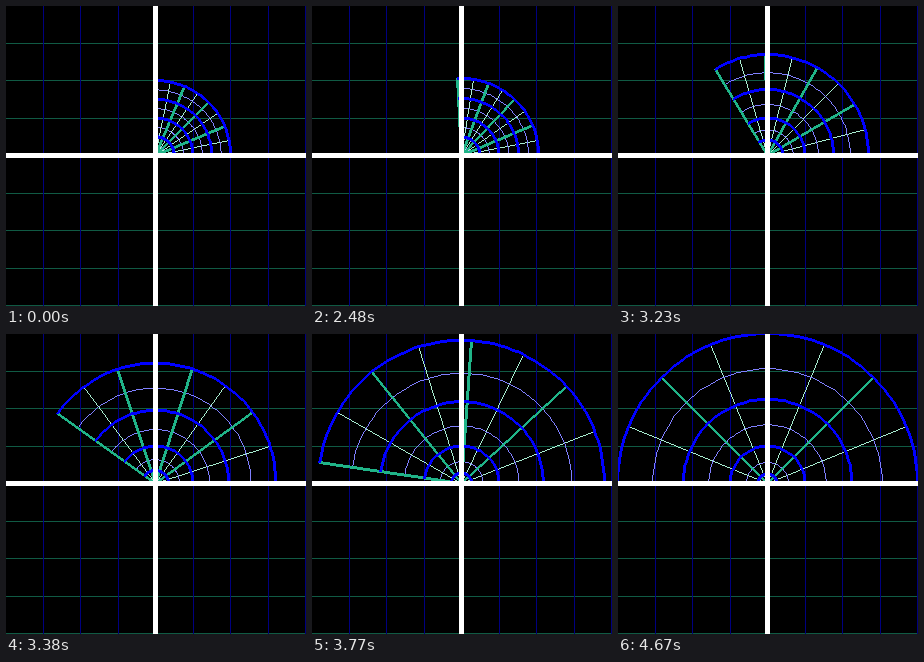
These frames come from a looping animation (300x300 px, 6.67 s). An HTML page with a canvas:

```html
<!DOCTYPE html>
<html lang="en">
<head>
<meta charset="utf-8">
<title>Squaring a polar grid</title>
<style>
  html, body { margin: 0; width: 100%; height: 100%; overflow: hidden; background: #000; }
  canvas { display: block; width: 300px; height: 300px; }
</style>
</head>
<body>
<canvas id="stage" width="300" height="300"></canvas>
<script>
const ctx = document.getElementById('stage').getContext('2d');
const LOOP = 6670, HOLD = 2000, STEP = 30, STEPS = 90;
const CENTER = 149.5, UNIT = 37.5, STEEP = 7, SEGMENTS = 60;
const BLUE = '#0000ff', PALE_BLUE = '#8080ff', DARK_BLUE = '#000080';
const GREEN = '#20b488', PALE_GREEN = '#a8ecd0', DARK_GREEN = '#105a44';

// Arctangent easing from 0 to 1, advanced in fixed steps after the first hold.
function progress(ms) {
  if (ms < HOLD) return 0;
  const step = Math.min(STEPS, Math.floor((ms - HOLD) / STEP) + 1);
  const x = 2 * step / STEPS - 1;
  return 0.5 + 0.5 * Math.atan(STEEP * x) / Math.atan(STEEP);
}

const toPixel = v => Math.floor(CENTER + v);
const polar = (r, a) => [toPixel(r * Math.cos(a)), toPixel(-r * Math.sin(a))];

// Hard-edged line whose width is measured across its shorter axis.
function line([x0, y0], [x1, y1], width) {
  const dx = x1 - x0, dy = y1 - y0, half = width >> 1;
  const steep = Math.abs(dy) > Math.abs(dx);
  const count = Math.max(Math.abs(dx), Math.abs(dy), 1);
  for (let i = 0; i <= count; i++) {
    const x = Math.round(x0 + dx * i / count);
    const y = Math.round(y0 + dy * i / count);
    if (steep) ctx.fillRect(x - half, y, width, 1);
    else ctx.fillRect(x, y - half, 1, width);
  }
}

function drawBackground() {
  ctx.fillStyle = '#000';
  ctx.fillRect(0, 0, 300, 300);
  ctx.fillStyle = DARK_GREEN;
  for (let n = -3; n <= 4; n++) ctx.fillRect(0, toPixel(n * UNIT), 300, 1);
  ctx.fillStyle = DARK_BLUE;
  for (let n = -3; n <= 4; n++) ctx.fillRect(toPixel(n * UNIT), 0, 1, 300);
}

// Blend z into z squared: radius r to r * r, angle a to 2a.
function drawGrid(t) {
  const radius = r => UNIT * (r + t * (r * r - r));
  const sweep = Math.PI / 2 * (1 + t);
  function arc(r, color, width) {
    ctx.fillStyle = color;
    for (let i = 0; i < SEGMENTS; i++) {
      line(polar(radius(r), sweep * i / SEGMENTS),
           polar(radius(r), sweep * (i + 1) / SEGMENTS), width);
    }
  }
  function ray(n, color, width) {
    ctx.fillStyle = color;
    line(polar(0, 0), polar(radius(2), sweep * n / 8), width);
  }
  for (let n = 1; n < 8; n += 2) {
    arc(n / 4, PALE_BLUE, 1);
    ray(n, PALE_GREEN, 1);
  }
  for (let n = 0; n <= 8; n += 2) ray(n, GREEN, 3);
  for (let n = 2; n <= 8; n += 2) arc(n / 4, BLUE, 3);
}

function drawAxes() {
  ctx.fillStyle = '#fff';
  ctx.fillRect(147, 0, 5, 300);
  ctx.fillRect(0, 147, 300, 5);
}

function frame(now) {
  drawBackground();
  drawGrid(progress(now % LOOP));
  drawAxes();
  requestAnimationFrame(frame);
}
requestAnimationFrame(frame);
</script>
</body>
</html>
```
